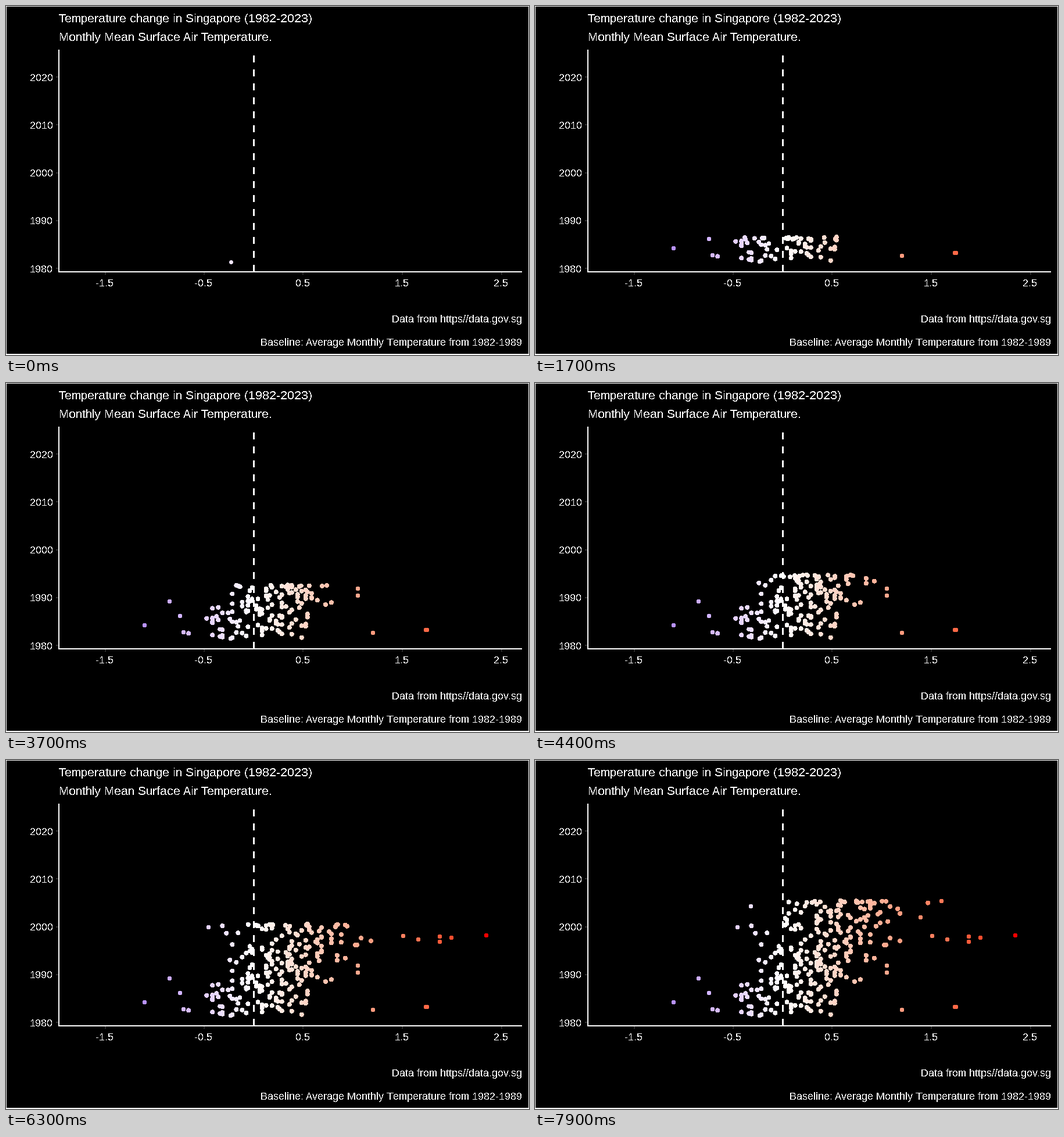
A matplotlib script that plays this animation: 900x600 px, repeating every 8 s.

```python
import numpy as np
import matplotlib.pyplot as plt
from matplotlib.animation import FuncAnimation
from matplotlib.patches import Rectangle

plt.rcParams["font.family"] = "Liberation Sans"
# whole-pixel glyph spacing, as in a screen font
plt.rcParams["text.hinting"] = "native"
plt.rcParams["text.hinting_factor"] = 1

W, H, FRAMES = 900, 600, 80
ZERO_X, MAX_X = 426, 826        # no change, largest change
START_Y, YEAR = 439, 8.22       # first month, height of one year
STEP = 2.505                    # rise of the time front per frame
YEARS = 26
DEGREE = 170.5

# The first month and the extremes, as (x, y)
EXTREMES = [
    (386, 439), (305, 428), (631, 429), (722, 424), (724, 424), (238, 416),
    (299, 400), (281, 375), (605, 353), (605, 365), (709, 308), (746, 303),
    (746, 312), (766, 305), (826, 301), (683, 302), (348, 287), (371, 251),
    (663, 270), (699, 242),
]


def bump(k, centre, width=0.8):
    return np.exp(-((k - centre) / width) ** 2)


def build_months():
    """Fill every year up to twelve points, ordered by time."""
    rng = np.random.default_rng(12)
    pts = list(EXTREMES)
    years = [int((START_Y - y) / YEAR) for _, y in EXTREMES]
    for k in range(YEARS):
        n = 12 - years.count(k)
        # slow warming, a hot spell in 1997 and a cool one after it
        mean = 422 + 5 * k + 75 * bump(k, 15.4) - 30 * bump(k, 17.6)
        x = mean + rng.triangular(-122, 0, 122, n)
        # tenths of a degree, shifted by each month's baseline
        x = ZERO_X - 3 + DEGREE / 10 * np.round((x - ZERO_X) / DEGREE * 10)
        x += rng.choice([-4, 0, 0, 7, 10], n)
        y = START_Y - 1 - YEAR * (k + (np.arange(n) + rng.random(n)) / n)
        pts += list(zip(x, y))
    return np.array(sorted(pts, key=lambda p: -p[1]))


def diverging(x):
    """Blue - white - red, blended in CIE Lab."""
    t = np.clip((np.asarray(x) - ZERO_X) / (MAX_X - ZERO_X), -1, 1)[:, None]
    white = np.array([100, 0, 0])
    blue, red = np.array([32.3, 79.2, -107.9]), np.array([53.2, 80.1, 67.2])
    lab = white + np.abs(t) * (np.where(t < 0, blue, red) - white)
    fy = (lab[:, 0] + 16) / 116
    f = np.stack([fy + lab[:, 1] / 500, fy, fy - lab[:, 2] / 200], axis=1)
    xyz = np.where(f > 6 / 29, f ** 3, (f - 4 / 29) * 108 / 841)
    xyz = xyz * [0.9505, 1, 1.089]
    rgb = xyz @ np.array([[3.2406, -0.9689, 0.0557],
                          [-1.5372, 1.8758, -0.2040],
                          [-0.4986, 0.0415, 1.0570]])
    rgb = np.clip(rgb, 0, 1)
    return np.clip(np.where(rgb > 0.0031308,
                            1.055 * rgb ** (1 / 2.4) - 0.055,
                            12.92 * rgb), 0, 1)


fig = plt.figure(figsize=(W / 72, H / 72), dpi=72, facecolor="black")
ax = fig.add_axes([0, 0, 1, 1])
ax.set(xlim=(0, W), ylim=(H, 0))
ax.axis("off")


def bar(x, y, w, h, color="white"):
    ax.add_patch(Rectangle((x, y), w, h, fc=color, lw=0, antialiased=False))


def label(x, y, text, size=18, ha="left"):
    ax.text(x, y, text, size=size, ha=ha, va="baseline", color="white",
            antialiased=False)


# plot border
bar(0, 0, W, 1)
bar(0, H - 2, W, 2)
bar(0, 0, 1, H)
bar(W - 1, 0, 1, H)

# axes
for i in range(5):
    y = 450 - 82.25 * i
    bar(86, round(y), 4, 2, "#333333")
    label(81, round(y + 7.6), str(1980 + 10 * i), ha="right")
    x = 169.5 + DEGREE * i
    bar(round(x), 458, 2, 4, "#333333")
    label(x, 482, f"{i - 1.5:.1f}", ha="center")
bar(90, 75, 2, 383)
bar(90, 456, 798, 2)

# dashed zero line
for y in range(85, 457, 24):
    bar(425, y, 3, 12)

label(91, 28, "Temperature change in Singapore (1982-2023)", 21)
label(91, 60, "Monthly Mean Surface Air Temperature.", 21)
label(888, 544, "Data from https//data.gov.sg", ha="right")
label(888, 584, "Baseline: Average Monthly Temperature from 1982-1989",
      ha="right")

months = build_months()
tracks = [months[m::12] for m in range(12)]
lag = np.random.default_rng(5).uniform(1, 4, 12)
dots = ax.scatter([], [], s=49, linewidths=0, antialiased=False, zorder=3)


def live_points(now):
    """One moving point per calendar month, between its yearly values."""
    return [(np.interp(-now, -t[:, 1], t[:, 0]), now + d)
            for t, d in zip(tracks, lag) if t[0, 1] > now]


def draw(i):
    now = START_Y - STEP * i
    past = months[months[:, 1] >= now]
    live = np.array(live_points(now)).reshape(-1, 2)
    pts = np.vstack([past, live])
    dots.set_offsets(pts + 0.5)
    dots.set_facecolors(diverging(pts[:, 0]))
    return dots,


anim = FuncAnimation(fig, draw, frames=FRAMES, interval=100, repeat=True,
                     repeat_delay=0, blit=False)
plt.show()
```
